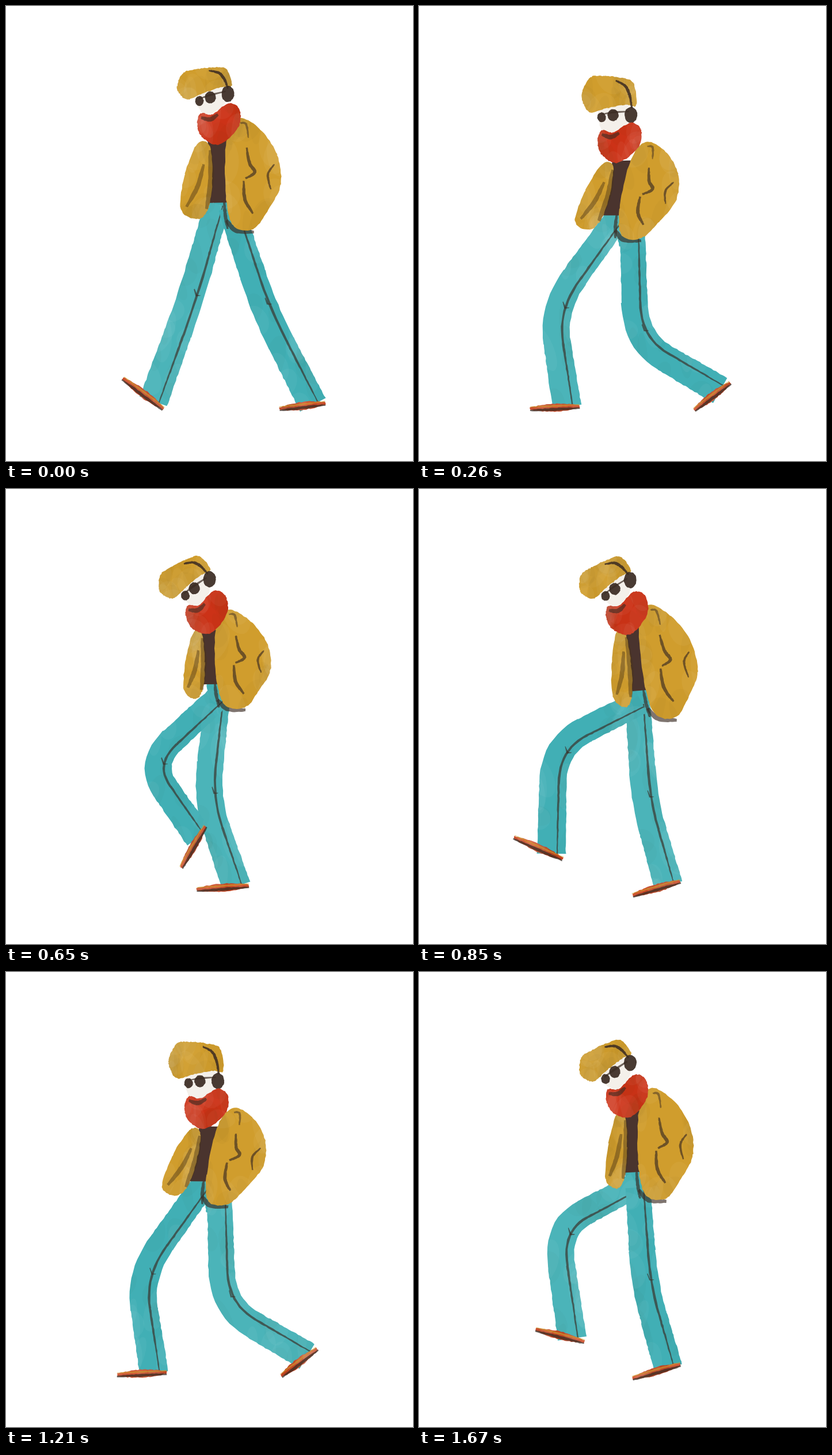
An HTML page with a canvas that plays this animation: 707 px wide and 792 px high, repeating every 1.77 s.

```html
<!DOCTYPE html>
<html lang="en">
<head>
<meta charset="utf-8">
<title>Walk cycle</title>
<style>
html, body { margin: 0; width: 100%; height: 100%; overflow: hidden; background: #fff; }
canvas { display: block; width: 707px; height: 792px; }
</style>
</head>
<body>
<canvas id="stage" width="707" height="792"></canvas>
<script>
const ctx = document.getElementById('stage').getContext('2d');
const INK = '#3a2a22', TEAL = '#41afb5', COAT = '#d09d2d', RED = '#cc3217', SHOE = '#cf4520';

// Rig: head = x, y, tilt in degrees, length of the face; legs = hip, knee, ankle, toe.
const contact = {
  head: [355, 159, -13, 1], neck: [371, 238], hem: [371, 388], flare: 1.25,
  far: [[367, 345], [322, 505], [256, 688], [203, 648]],
  near: [[390, 350], [449, 530], [533, 694], [475, 701]]
};
const down = {
  head: [337, 190, -3, 1.3], neck: [354, 274], hem: [327, 404], flare: 1.15,
  far: [[345, 368], [231, 527], [257, 698], [193, 701]],
  near: [[371, 390], [376, 583], [523, 669], [478, 703]]
};
const up = {
  head: [326, 147, -28, 1], neck: [356, 220], hem: [352, 358], flare: 1,
  far: [[354, 342], [249, 475], [344, 588], [334, 634]],
  near: [[372, 340], [365, 540], [385, 696], [313, 701]]
};
const pass = {
  head: [327, 173, -33, 1], neck: [352, 248], hem: [356, 380], flare: 0.85,
  far: [[368, 360], [348, 538], [400, 692], [331, 697]],
  near: [[370, 362], [246, 478], [335, 606], [304, 659]]
};
const lift = {
  head: [340, 174, -32, 1], neck: [370, 245], hem: [387, 397], flare: 0.85,
  far: [[380, 375], [392, 545], [433, 689], [371, 707]],
  near: [[386, 370], [234, 447], [230, 635], [165, 606]]
};

const mix = (a, b, t) => Array.isArray(a) ? a.map((v, i) => mix(v, b[i], t)) : a + (b - a) * t;
const between = (a, b, t = 0.5) =>
  Object.fromEntries(Object.keys(a).map(k => [k, mix(a[k], b[k], t)]));
const swap = p => ({ ...p, far: p.near, near: p.far });

const steppedOff = swap(contact), downB = swap(down), upA = swap(up);
const liftB = { ...swap(lift), hem: [370, 394], far: [[378, 370], [238, 445], [266, 638], [203, 622]] };
const frames = [
  [130, contact], [130, between(contact, down)], [130, down],
  [130, between(down, upA)], [130, upA],
  [100, pass], [100, between(pass, lift)], [100, lift],
  [130, steppedOff], [130, between(steppedOff, downB)], [130, downB],
  [130, between(downB, up)],
  [100, up], [100, between(swap(pass), liftB, 0.3)], [100, liftB]
];
const LOOP = frames.reduce((sum, f) => sum + f[0], 0);

let seed = 1;
const rand = (lo, hi) => lo + (hi - lo) * ((seed = seed * 16807 % 2147483647) / 2147483647);
const points = s => s.split(' ').map(p => p.split(',').map(Number));
const steps = (n, fn) => Array.from({ length: n + 1 }, (_, i) => fn(i / n));
const line = (a, b) => steps(24, t => mix(a, b, t));

// Catmull-Rom through a few points
function smooth(run, closed) {
  const n = run.length;
  const at = i => closed ? run[(i + n) % n] : run[Math.max(0, Math.min(n - 1, i))];
  return Array.from({ length: closed ? n : n - 1 }, (_, i) => {
    const [a, b, c, d] = [at(i - 1), at(i), at(i + 1), at(i + 2)];
    return steps(10, t => [0, 1].map(j => b[j] + t / 2 * (c[j] - a[j] +
      t * (2 * a[j] - 5 * b[j] + 4 * c[j] - d[j] + t * (3 * (b[j] - c[j]) + d[j] - a[j])))));
  }).flat();
}

// Midline of a leg: two straight bones with a rounded knee
function bend(hip, knee, ankle) {
  const a = mix(knee, hip, 0.35), b = mix(knee, ankle, 0.35);
  return [...line(hip, a), ...steps(12, t => mix(mix(a, knee, t), mix(knee, b, t), t)), ...line(b, ankle)];
}

// Shift a path sideways by dist(u), u running from 0 to 1
function offset(pts, dist) {
  const last = pts.length - 1;
  return pts.map(([x, y], i) => {
    const a = pts[Math.max(0, i - 2)], b = pts[Math.min(last, i + 2)];
    const dx = b[0] - a[0], dy = b[1] - a[1], d = dist(i / last) / (Math.hypot(dx, dy) || 1);
    return [x - dy * d, y + dx * d];
  });
}
const ribbon = (pts, width) =>
  [...offset(pts, u => width(u) / 2), ...offset(pts, u => -width(u) / 2).reverse()];

function fill(pts, color, rough = 0.7, alpha = 1) {
  ctx.globalAlpha = alpha;
  ctx.fillStyle = color;
  ctx.beginPath();
  pts.forEach(([x, y]) => ctx.lineTo(x + rand(-rough, rough), y + rand(-rough, rough)));
  ctx.closePath();
  ctx.fill();
  ctx.globalAlpha = 1;
}

// Fill with faint pigment dabs inside
function wash(pts, color) {
  ctx.save();
  fill(pts, color);
  ctx.clip();
  for (let i = 0; i < 20; i++) {
    const [x, y] = pts[Math.floor(rand(0, pts.length))];
    ctx.fillStyle = i % 2 ? 'rgba(255,255,255,.04)' : 'rgba(60,40,0,.025)';
    ctx.beginPath();
    ctx.ellipse(x, y, rand(8, 25), rand(15, 45), rand(-0.5, 0.5), 0, 7);
    ctx.fill();
  }
  ctx.restore();
}

const brush = (pts, width, alpha = 0.65, color = INK) =>
  fill(ribbon(pts, u => width * (0.5 + 0.5 * Math.sin(Math.PI * u))), color, 0.4, alpha);

function leg([hip, knee, ankle, toe], color) {
  const mid = bend(hip, knee, ankle);
  wash(ribbon(mid, u => 43 + 7 * u), color);
  const crease = offset(mid, () => -10), [kx, ky] = crease[30];
  brush(crease, 4, 0.65);
  brush([[kx - 6, ky - 7], [kx - 2, ky + 4], [kx + 5, ky + 4]], 3);

  const len = Math.hypot(ankle[0] - toe[0], ankle[1] - toe[1]);
  const sole = line(toe, mix(toe, ankle, 1 + 22 / len));
  wash(ribbon(sole, u => 4 + 10 * Math.sin(Math.PI * u)), SHOE);
  brush(offset(sole, () => -3), 3, 0.6, COAT);
  brush(offset(sole, () => 3), 5, 0.75);
}

function torso({ neck, hem, flare }) {
  const put = s => points(s).map(([x, y]) => {
    const v = y / 140;
    return [neck[0] + x * (x < 0 ? flare : 1) + (hem[0] - neck[0]) * v, neck[1] + (hem[1] - neck[1]) * v];
  });
  const stroke = (s, ...style) => brush(smooth(put(s)), ...style);

  stroke('8,95 10,118 14,140', 6);
  stroke('12,126 28,142 60,145', 9);
  fill(put('-17,-5 16,-5 15,97 -14,98'), '#4a342e');
  wash(smooth(put('-31,2 -14,5 -10,56 -15,104 -30,124 -54,108 -48,50'), true), COAT);
  stroke('-13,12 -12,60 -18,108', 10, 0.45, '#4a3418');
  stroke('-22,35 -31,72 -46,104', 8, 0.45, '#4a3418');
  wash(smooth(put('32,-40 70,-22 100,20 106,68 85,108 59,140 24,135 11,85 12,-3'), true), COAT);
  stroke('47,8 52,33 61,48 45,58', 6);
  stroke('42,62 44,92 58,115', 6);
  stroke('95,35 84,52 89,76', 4);
  stroke('36,-32 46,-30 50,-8', 4, 0.5);
}

function head([x, y, tilt, long]) {
  // The beard follows only half of the tilt
  const frame = (deg, sy) => s => {
    const c = Math.cos(deg * Math.PI / 180), n = Math.sin(deg * Math.PI / 180);
    return points(s).map(([px, py]) => [x + px * c - py * sy * n, y + px * n + py * sy * c]);
  };
  const skull = frame(tilt, long), jaw = frame(tilt / 2, 1);
  const dot = (s, rx, ry) => {
    const [[cx, cy]] = skull(s);
    fill(steps(28, t => [cx + rx * Math.cos(t * 2 * Math.PI), cy + ry * Math.sin(t * 2 * Math.PI)]), INK, 0.5, 0.92);
  };

  fill(smooth(skull('-24,-12 0,-16 26,-14 22,16 -6,28 -22,18'), true), '#f4f0ea');
  wash(smooth(skull('-52,-32 -36,-52 -12,-53 14,-50 38,-42 41,-12 24,-13 -9,-10 -38,-5 -50,-17'), true), COAT);
  brush(smooth(skull('8,-46 24,-38 31,-24 33,-8')), 5, 0.85);
  brush(skull('-20,-2 0,-4 28,-4'), 4, 0.7);
  dot('-20,2', 7.5, 8.5);
  dot('0,0', 9.5, 10.5);
  dot('31,1', 11, 14);
  wash(smooth(jaw('-20,26 0,30 30,14 48,27 42,58 6,83 -21,69 -28,45'), true), RED);
  brush(smooth(jaw('-20,33 -5,38 10,31')), 8, 0.6);
}

function draw(pose, n) {
  seed = 977 * (n + 1);
  ctx.fillStyle = '#fff';
  ctx.fillRect(0, 0, 707, 792);
  // Seat of the trousers joins both hips under the coat
  const hips = mix(pose.far[0], pose.near[0], 0.5);
  fill(ribbon(line([hips[0], hips[1] - 30], [hips[0], hips[1] + 40]), u => 44 - 24 * u), TEAL);
  leg(pose.far, '#4bb4b9');
  leg(pose.near, TEAL);
  torso(pose);
  head(pose.head);
}

let shown = -1;
function tick() {
  let t = performance.now() % LOOP, i = 0;
  while (t >= frames[i][0]) t -= frames[i++][0];
  if (i !== shown) draw(frames[shown = i][1], i);
  requestAnimationFrame(tick);
}
tick();
</script>
</body>
</html>
```
